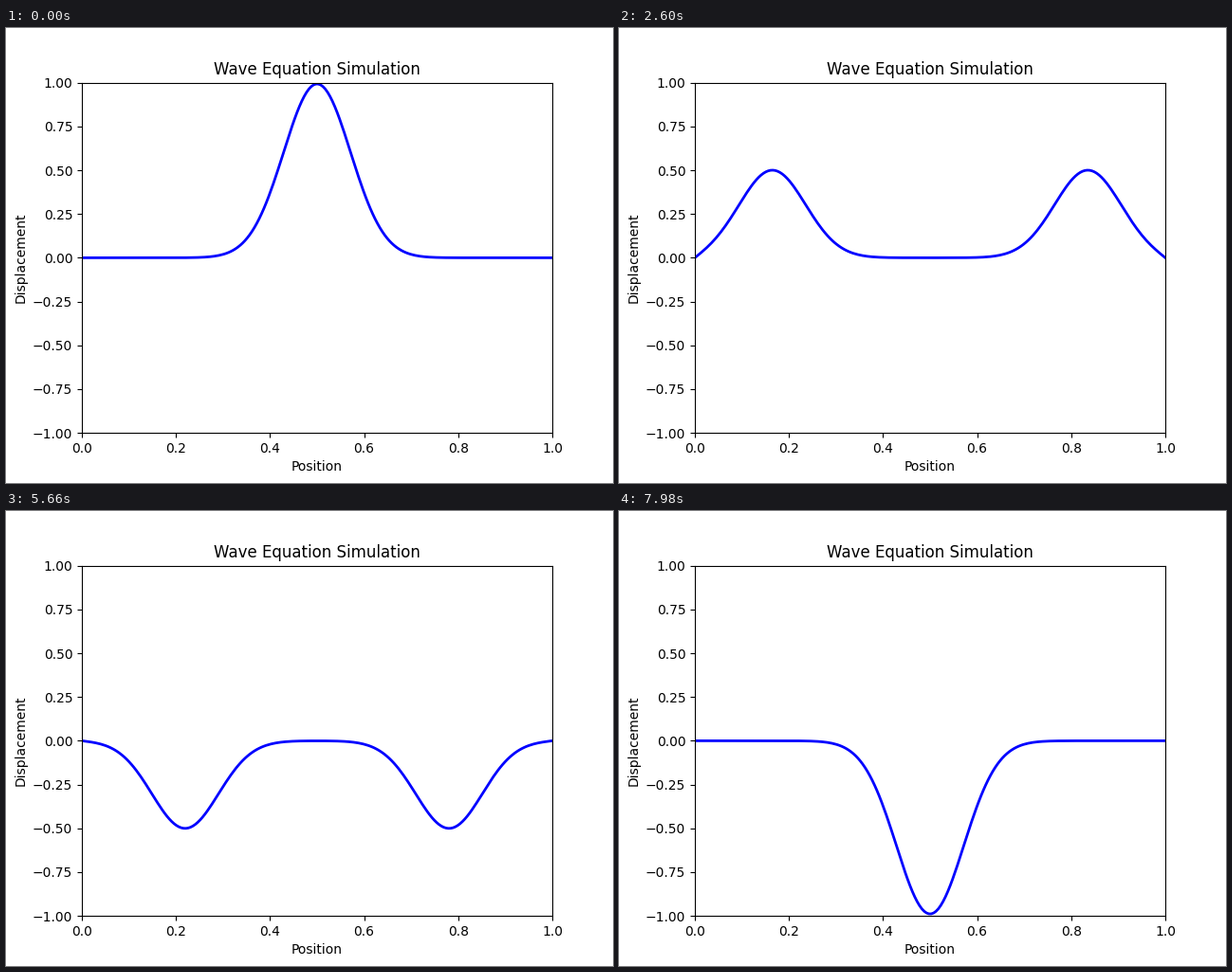
Animation, 640 px wide and 480 px high, one loop 8000 ms. Source, as a matplotlib script:

```python
import numpy as np
import matplotlib.pyplot as plt
from matplotlib.animation import FuncAnimation

POINTS = 200
FRAMES = 400
INTERVAL = 20      # ms
COURANT = 0.5      # wave speed * dt / dx
WARMUP = 3         # steps taken before the first picture


def solve(start, steps):
    """Leapfrog solution of the wave equation with both ends held at zero."""
    states = [start, start]
    for _ in range(steps):
        prev, cur = states[-2:]
        new = np.zeros_like(cur)
        bend = cur[2:] - 2 * cur[1:-1] + cur[:-2]
        new[1:-1] = 2 * cur[1:-1] - prev[1:-1] + COURANT**2 * bend
        states.append(new)
    return states[1:]


x = np.linspace(0, 1, POINTS)
waves = solve(np.exp(-100 * (x - 0.5) ** 2), FRAMES + WARMUP)

fig, ax = plt.subplots(figsize=(6.4, 4.8), dpi=100)
ax.set(xlim=(0, 1), ylim=(-1, 1), xlabel="Position", ylabel="Displacement",
       title="Wave Equation Simulation")
line, = ax.plot(x, waves[WARMUP], color="blue", lw=2)


def update(frame):
    line.set_ydata(waves[frame + WARMUP])
    return line,


def init():
    return update(0)


anim = FuncAnimation(fig, update, frames=FRAMES, init_func=init,
                     interval=INTERVAL, repeat=True, repeat_delay=0)
plt.show()
```
